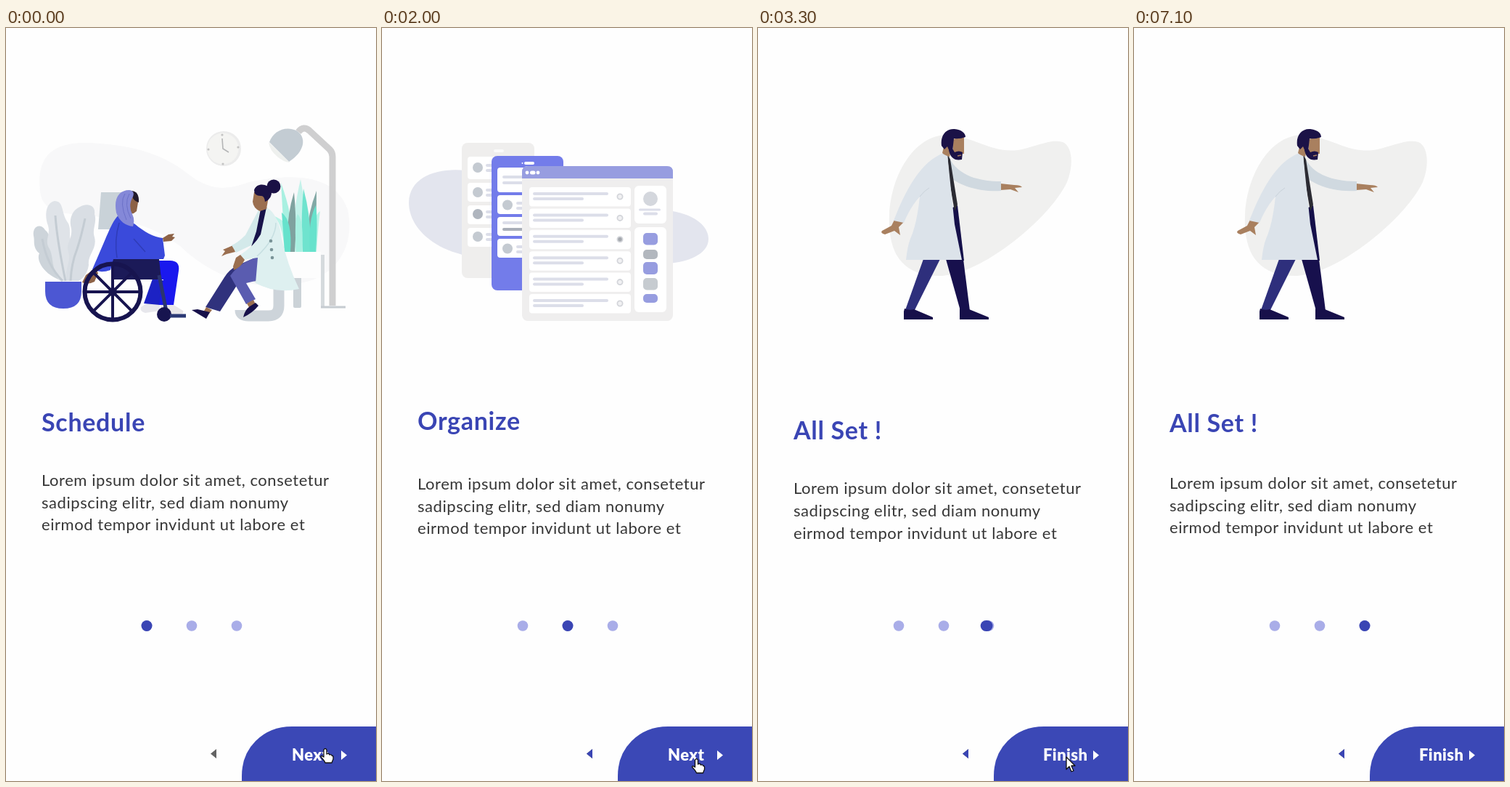
Recreate the animation shown at these times as an HTML page. Size 510x1036 px, loop 7.7 s.

```html
<!DOCTYPE html>
<html lang="en">
<head>
<meta charset="utf-8">
<title>Onboarding</title>
<style>
html, body { margin: 0; width: 100%; height: 100%; overflow: hidden; background: #fefefe; }
svg { display: block; width: 100%; height: 100%; }
text { font-family: Lato, "Open Sans", sans-serif; }
.head { font-size: 34px; font-weight: 700; letter-spacing: .7px; fill: #3a45b4; }
.body { font-size: 22px; letter-spacing: .55px; fill: #363636; }
.label { font-size: 22px; font-weight: 900; letter-spacing: .4px; fill: #fff; }
</style>
</head>
<body>
<svg viewBox="0 0 510 1036" preserveAspectRatio="xMidYMid slice">
  <defs>
    <clipPath id="headClip"><rect x="0" y="516" width="510" height="50"/></clipPath>
    <clipPath id="bodyClip"><rect x="0" y="606" width="510" height="148"/></clipPath>
  </defs>

  <g class="art" id="visit">
    <path fill="#f8f8f9" d="M47 225C42 180 60 157 112 158C170 160 215 172 250 200C278 222 300 225 335 212C400 198 455 203 471 250C482 300 455 345 400 352C330 365 270 330 240 300C200 270 160 262 110 258C70 255 50 250 47 225Z"/>
    <circle cx="300" cy="166" r="24" fill="#ececec"/>
    <circle cx="299" cy="166" r="21.5" fill="#f4f4f2"/>
    <path d="M298 152L299 166L307 171" fill="none" stroke="#b4b5b6" stroke-width="1.6"/>
    <g fill="#c3c3c3"><circle cx="298" cy="147" r="1.6"/><circle cx="320" cy="164" r="1.6"/><circle cx="299" cy="187" r="1.6"/><circle cx="279" cy="167" r="1.6"/></g>

    <rect x="396" y="308" width="11" height="77" rx="2" fill="#cbd2d7"/>
    <rect x="434" y="312" width="5" height="73" fill="#d5dadd"/>
    <path d="M382 308H434V344H396Z" fill="#fdfdfd"/>
    <g id="spikes"></g>
    <path d="M403 143Q410 134 418 141L446 167Q450 171 450 177V382" fill="none" stroke="#cfcfd0" stroke-width="9"/>
    <path d="M434 384H468" stroke="#c6ccd1" stroke-width="3"/>
    <path d="M363 157C368 142 385 134 400 141C415 150 412 170 390 184Z" fill="#c3ccd3"/>
    <path d="M362 157L391 185Q382 184 374 177Q363 168 362 157Z" fill="#eef0ee"/>

    <path d="M131 226H166V277H127Z" fill="#c9d2d8"/>
    <path d="M80 348C58 344 40 322 46 310C36 302 40 292 38 286C36 272 48 268 54 278C62 284 60 296 70 304C78 316 84 334 84 348Z" fill="#cdd4da"/>
    <path d="M74 348C62 330 66 316 60 304C52 292 62 284 58 272C52 256 56 240 67 238C80 238 76 254 84 266C92 276 84 288 92 298C98 314 92 334 90 348Z" fill="#dfe3e8"/>
    <path d="M84 348C80 332 90 322 86 308C82 296 92 290 90 276C86 262 92 250 102 246C112 240 124 244 122 256C126 268 118 276 122 288C126 304 112 312 114 326C112 340 104 346 100 348Z" fill="#d9dee4"/>
    <path d="M68 258Q70 290 82 348M50 290Q56 326 78 348M109 262Q104 286 98 304Q90 324 89 348" fill="none" stroke="#c4ccd3" stroke-width="3"/>
    <path d="M54 349H104V362Q104 386 79 386Q54 386 54 362Z" fill="#4c57d3"/>

    <path d="M212 378Q196 376 186 384Q184 390 192 392L212 389Z" fill="#e7e7ec"/>
    <path d="M202 345L190 379L212 381L222 348Z" fill="#1c22c4"/>
    <path d="M198 320H226Q240 320 238 334L231 381H211L217 346H198Z" fill="#1a18ee"/>
    <path d="M213 381H231L244 389Q246 394 238 394H214Z" fill="#e9e6e8"/>
    <path d="M147 318H211L214 346H147Z" fill="#1b1a58"/>
    <path d="M211 340L221 390" stroke="#2b356f" stroke-width="5"/>
    <path d="M122 331L127 337L122 349Q112 354 105 350L110 340Z" fill="#8d6246"/>
    <path d="M156 257C146 264 138 290 119 332Q130 338 144 333L148 318H217L219 313L216 289C204 288 190 280 178 270Z" fill="#3a4adb"/>
    <path d="M156 268Q149 292 153 316M176 290L192 308" fill="none" stroke="#2f3cb8" stroke-width="1.5"/>
    <path d="M216 289L224 284L232 283L229 287L233 288L228 293L217 294Z" fill="#8d6246"/>
    <path d="M168 225Q182 222 182 240L180 252Q174 258 168 254Z" fill="#8d6246"/>
    <path d="M172 224Q184 224 183 240Q176 238 174 232Z" fill="#221a2b"/>
    <path d="M152 254C148 234 156 223 170 223Q178 224 175 232Q168 244 174 256Q178 264 175 273C165 272 156 266 152 254Z" fill="#8488d8"/>
    <path d="M164 228Q156 240 166 264M170 228Q162 242 172 262" fill="none" stroke="#6c71c8"/>
    <g stroke="#17144f" fill="none">
      <circle cx="147" cy="363" r="38.5" stroke-width="6"/>
      <path id="spokes" stroke-width="4"/>
    </g>
    <circle cx="147" cy="363" r="6" fill="#17144f"/>
    <circle cx="218" cy="394" r="10" fill="#17144f"/>
    <path d="M226 396H248" stroke="#2b3974" stroke-width="5"/>

    <path d="M376 342V382Q376 396 362 396H334Q323 396 323 388" fill="none" stroke="#cdd4da" stroke-width="15"/>
    <path d="M338 336H384V350H345Q335 348 338 336Z" fill="#cdd4da"/>
    <path d="M348 314L318 327Q307 333 301 343L275 384L295 390L324 345L350 338Z" fill="#30327d"/>
    <path d="M276 384L284 388L279 394L272 391Z" fill="#9b6f50"/>
    <path d="M256 388L264 387L281 391L276 400Z" fill="#17104a"/>
    <path d="M350 314Q322 322 309 341L331 380L344 373L331 351L352 346Z" fill="#5a5cb0"/>
    <path d="M332 379L341 374L345 382L336 386Z" fill="#9b6f50"/>
    <path d="M327 398Q329 388 336 383L344 378L348 382Q340 392 327 398Z" fill="#17104a"/>
    <path d="M313 299L316 308L304 311L297 314L302 307L299 305Z" fill="#9b6f50"/>
    <path d="M350 247L330 285Q320 295 311 299L317 309L344 296Z" fill="#d3e9ea"/>
    <path d="M351 249L360 247L354 283L337 304L345 280Z" fill="#17134a"/>
    <path d="M359 247C370 252 378 270 380 290Q388 326 404 359Q372 366 344 351L347 316L326 319L323 312Q342 300 351 284Z" fill="#def0f0"/>
    <path d="M372 268Q372 290 346 314" fill="none" stroke="#c6dfe1" stroke-width="1.5"/>
    <path d="M323 312L329 319Q324 329 314 333L313 328L317 316Z" fill="#9b6f50"/>
    <g fill="#7a9498"><circle cx="365" cy="293" r="2.3"/><circle cx="366" cy="305" r="2.3"/><circle cx="367" cy="316" r="2.3"/></g>
    <path d="M342 226Q352 222 362 232L359 249L350 252Q341 248 340 239Z" fill="#9b6f50"/>
    <path d="M342 223C345 213 361 213 366 224Q367 235 357 239Q356 230 351 231Q342 231 342 223Z" fill="#1a1145"/>
    <circle cx="369" cy="218" r="9.5" fill="#1a1145"/>
  </g>

  <g class="art" id="boards">
    <path fill="#e3e5ee" d="M37 240C38 205 75 192 115 196C200 200 300 240 400 252C435 258 450 275 450 290C450 312 420 322 395 324C300 335 150 330 90 305C55 290 37 265 37 240Z"/>
  </g>

  <g class="art" id="doctor">
    <path fill="#f0f0ef" d="M153 272C150 210 185 145 235 147C275 152 295 172 330 168C360 162 375 152 392 157C406 163 407 190 398 212C385 240 350 275 320 297C285 323 255 338 225 341C175 342 155 315 153 272Z"/>
    <path d="M200 318H223L187 390L175 388Z" fill="#2e2f7c"/>
    <path d="M231 318H255L264 389H251Z" fill="#17104d"/>
    <path d="M238 248L247 244L256 320H248Z" fill="#15104a"/>
    <path d="M174 386Q180 389 187 387L213 398V401H173V390Z" fill="#17104a"/>
    <path d="M250 386Q256 389 263 387L290 398V401H250Z" fill="#17104a"/>
    <path d="M160 264L173 267L166 274L168 285L160 279L147 284Q140 282 143 279L156 272Z" fill="#a9805f"/>
    <path d="M306 214L325 216Q334 216 336 219L326 220L331 226L320 222L306 223Z" fill="#a9805f"/>
    <path d="M235 177C247 204 278 211 307 211V224C280 226 252 218 238 206Z" fill="#d0d9e0"/>
    <path d="M233 173L237 181L247 243L243 252L236 212Z" fill="#2b2b33"/>
    <path d="M228 172C196 184 176 222 159 265L173 268Q182 246 195 232Q191 270 182 290Q178 300 176 319H253L243 270L233 174Z" fill="#dce3ea"/>
    <path d="M195 232Q201 224 208 220" fill="none" stroke="#c9d2da"/>
    <path d="M229 160H240L236 177Q229 175 226 172Z" fill="#a9805f"/>
    <path d="M240 153L256 150V173L241 174Z" fill="#a9805f"/>
    <path d="M225 162C223 148 231 138 243 139C252 140 258 144 258 150Q250 153 242 152L240 170H236L233 163L229 167Z" fill="#1b1247"/>
    <path d="M235 168L240 166L243 171Q249 168 254 171L253 181Q238 184 235 168Z" fill="#1b1247"/>
    <path d="M247 176L252 175" stroke="#a9805f" stroke-width="1.5"/>
  </g>

  <g id="heads" clip-path="url(#headClip)"></g>
  <g id="bodies" clip-path="url(#bodyClip)"></g>

  <g fill="#a9ade8"><circle cx="194" cy="822.5" r="7.3"/><circle cx="256" cy="822.5" r="7.3"/><circle cx="318" cy="822.5" r="7.3"/></g>
  <rect id="pill" y="815" height="15" rx="7.5" fill="#3a45b4"/>

  <path d="M290 992L282 998.5L290 1005Z" fill="#636363"/>
  <path id="prev" d="M290 992L282 998.5L290 1005Z" fill="#3a45b4"/>
  <path d="M325 1036V1029Q325 1000 344 981Q364 961 394 961H510V1036Z" fill="#3b48b6"/>
  <text class="label" id="next" x="394" y="1008">Next</text>
  <text class="label" id="finish" x="393" y="1008">Finish</text>
  <path d="M462 994L470 1000.5L462 1007Z" fill="#fff"/>

  <g fill="#fff" stroke="#111" stroke-width="1.3" stroke-linejoin="round">
    <path id="hand" d="M-2 2Q0-1 2 2V8Q5 6 6 9Q9 8 9 10Q11 10 11 12V15Q10 17 9 20H0Q-1 17-6 12Q-6 9-2 12Z"/>
    <path id="arrow" d="M0 0V17L4 13L7 20L10 19L7 12H12Z"/>
  </g>
</svg>
<script>
const LOOP = 7700, STEP = 100, SLIDE = 600, DOT = 62;
const $ = id => document.getElementById(id);
const NS = "http://www.w3.org/2000/svg";

function add(parent, tag, attrs, content) {
  const el = document.createElementNS(NS, tag);
  for (const key in attrs) el.setAttribute(key, attrs[key]);
  if (content) el.textContent = content;
  return parent.appendChild(el);
}
const box = (parent, x, y, width, height, rx, fill) =>
  add(parent, "rect", { x, y, width, height, rx, fill });
const disc = (parent, cx, cy, r, fill) => add(parent, "circle", { cx, cy, r, fill });

function drawSpikes() {
  const leaf = (x, w, tx, ty, fill) => add($("spikes"), "path", {
    fill,
    d: `M${x - w} 308Q${x - w - 3} 265 ${tx} ${ty}Q${x + w + 3} 265 ${x + w} 308Z`
  });
  leaf(388, 4, 367, 258, "#bdf3e8");
  leaf(390, 5, 379, 213, "#a9f0e1");
  leaf(424, 4, 433, 252, "#bdf3e8");
  leaf(420, 5, 428, 224, "#82a8a5");
  leaf(405, 9, 406, 208, "#c4f2ea");
  leaf(393, 5, 397, 226, "#7fa29f");
  leaf(414, 5, 410, 221, "#6fe3ce");
  leaf(388, 4, 380, 254, "#66e2cc");
  leaf(423, 4, 427, 244, "#66e2cc");
  leaf(404, 4, 402, 256, "#a9f0e1");
}

function drawSpokes() {
  let d = "";
  for (let i = 0; i < 4; i++) {
    const a = i * Math.PI / 4, dx = 37 * Math.cos(a), dy = 37 * Math.sin(a);
    d += `M${147 - dx} ${363 - dy}L${147 + dx} ${363 + dy}`;
  }
  $("spokes").setAttribute("d", d);
}

function drawBoards() {
  const g = $("boards"), pale = "#dcdee9", blue = "#979de0", grey = "#c4cad1";
  const bars = (x, y, a, b, fill = pale, gap = 7) => {
    box(g, x, y, a, 4, 2, pale);
    box(g, x, y + gap, b, 4, 2, fill);
  };

  box(g, 110, 158, 100, 186, 8, "#efeeed");
  box(g, 154, 167, 14, 4, 2, "#fafafa");
  [177, 213, 244, 275].forEach((y, i) => {
    box(g, 118, y, 84, i ? 26 : 31, 4, "#fff");
    disc(g, 132, [192, 226, 256, 287][i], 7, i === 2 ? "#afb5be" : grey);
    bars(143, [187, 221, 251, 282][i], 40, 40);
  });

  box(g, 151, 176, 99, 185, 8, "#737cea");
  box(g, 196, 184, 14, 4, 2, "#fff");
  disc(g, 193.5, 186, 1, "#fff");
  [192, 230, 260, 290].forEach((y, i) => {
    box(g, 159, y, 82, i ? 26 : 34, 4, "#fff");
    if (i % 2) {
      disc(g, 173, y + 13.5, 7, grey);
      bars(185, y + 9, 40, 40);
    } else {
      bars(166, i ? 266 : 203, 50, 50, i ? "#aaafb9" : pale, i ? 9 : 8);
    }
  });

  box(g, 193, 190, 208, 213, 8, "#efeeee");
  add(g, "path", { d: "M193 207V198Q193 190 201 190H393Q401 190 401 198V207Z", fill: blue });
  disc(g, 200, 199, 2.4, "#fff");
  box(g, 204, 196.5, 7.5, 5, 2.5, "#fff");
  disc(g, 215, 199, 2.4, "#fff");
  for (let i = 0; i < 6; i++) {
    const y = 219 + 29.4 * i, dark = i === 2;
    box(g, 203, y, 140, 26.5, 4, "#fff");
    bars(208, y + 7, 104, 70);
    add(g, "circle", { cx: 328, cy: y + 13, r: 3.6, fill: dark ? "#a4a8ae" : "#f1f1f3", stroke: "#d3d5da", "stroke-width": 1.8 });
  }
  box(g, 348, 217, 44, 52, 6, "#fff");
  disc(g, 370, 235, 10, "#d4d7dd");
  box(g, 354, 248.5, 30, 3, 1.5, pale);
  box(g, 360, 253.5, 20, 4, 2, pale);
  box(g, 348, 274, 44, 117, 6, "#fff");
  [[282, 16.5, blue], [305, 13, "#b2b7be"], [322, 17, blue], [344, 16.5, "#c6cbd0"], [366, 12, blue]]
    .forEach(([y, h, fill]) => box(g, 360, y, 20, h, 5, fill));
}

const LINES = ["Lorem ipsum dolor sit amet, consetetur", "sadipscing elitr, sed diam nonumy", "eirmod tempor invidunt ut labore et"];
// headRise and bodyRise: how far below its place the text starts
const pages = [
  { art: "visit", title: "Schedule", headY: 555, bodyY: 630, headRise: 0, bodyRise: 0 },
  { art: "boards", title: "Organize", headY: 553, bodyY: 635, headRise: 176, bodyRise: 296 },
  { art: "doctor", title: "All Set !", headY: 556, bodyY: 634, headRise: 215, bodyRise: 153 }
];
for (const page of pages) {
  page.artEl = $(page.art);
  page.headEl = add($("heads"), "text", { class: "head", x: 49, y: page.headY }, page.title);
  page.bodyEl = add($("bodies"), "g", { class: "body" });
  LINES.forEach((line, i) => add(page.bodyEl, "text", { x: 49, y: page.bodyY + 30.7 * i }, line));
}
drawSpikes();
drawSpokes();
drawBoards();

const clamp = v => Math.min(1, Math.max(0, v));
const easeOut = v => 1 - (1 - clamp(v)) ** 3;
const smooth = v => (v = clamp(v), v * v * (3 - 2 * v));
const move = (el, x, y) => el.setAttribute("transform", `translate(${x} ${y})`);
const TEXT_EXIT = 180;

function drawCursor(t) {
  const isHand = t <= 1000 || (t >= 1800 && t <= 2700);
  const k = smooth(t / 800), out = smooth((t - 4900) / 600);
  $("hand").style.display = isHand ? "" : "none";
  $("arrow").style.display = isHand || out === 1 ? "none" : "";
  move($("hand"), 440 - 6.5 * k, 991 + 14 * k);
  move($("arrow"), 425 + 95 * out, 1003 - 40 * out);
}

function draw(t) {
  const p = [1, easeOut((t - 1000) / 1000), easeOut((t - 2660) / 1000), 0];
  const at = p[1] + p[2];
  pages.forEach((page, i) => {
    const hidden = 1 - p[i], gone = p[i + 1] * TEXT_EXIT;
    move(page.artEl, SLIDE * (i - at), 0);
    move(page.headEl, 0, page.headRise * hidden - gone);
    move(page.bodyEl, 0, page.bodyRise * hidden - gone);
  });

  const part = at % 1, width = 15 + 40 * part * (1 - part);
  $("pill").setAttribute("x", 194 + DOT * at - width / 2);
  $("pill").setAttribute("width", width);
  $("prev").style.opacity = p[1];
  $("next").style.opacity = 1 - p[2];
  $("finish").style.opacity = p[2];
  drawCursor(t);
}

const start = performance.now();
function tick() {
  const t = (performance.now() - start) % LOOP;
  draw(Math.floor(t / STEP) * STEP);
  requestAnimationFrame(tick);
}
tick();
</script>
</body>
</html>
```
